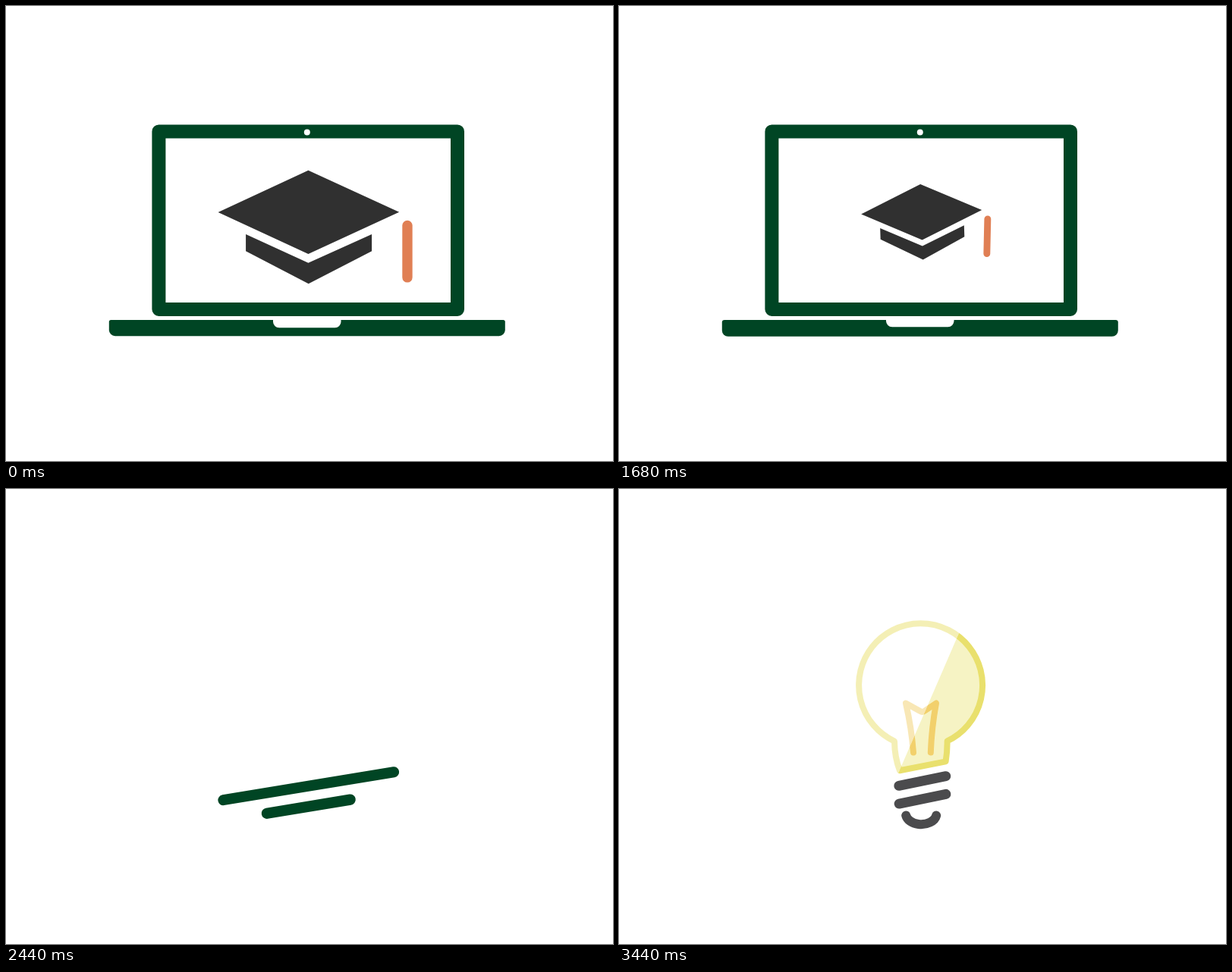
Animation of 800x600 px, one loop 4.04 s. Source, as an HTML page with a canvas:

```html
<!DOCTYPE html>
<html lang="en">
<head>
<meta charset="utf-8">
<title>Laptop to light bulb</title>
<style>
html, body { margin: 0; width: 100%; height: 100%; overflow: hidden; background: #fff; }
canvas { display: block; }
</style>
</head>
<body>
<canvas id="stage" width="800" height="600"></canvas>
<script>
const ctx = document.getElementById('stage').getContext('2d');
const LOOP = 4040, STEP = 40;
const GREEN = [0, 69, 36], GREY = [75, 75, 77];
const ORANGE = [224, 127, 84], OLIVE = [140, 130, 96];

// Progress of t through the time from a to b, and easings of it.
const span = (t, a, b) => Math.min(1, Math.max(0, (t - a) / (b - a)));
const lerp = (a, b, u) => a + (b - a) * u;
const smooth = u => u * u * (3 - 2 * u);
const easeOut = u => 1 - (1 - u) ** 2;
const backIn = (u, s) => u * u * ((s + 1) * u - s);
const backOut = (u, s) => 1 - backIn(1 - u, s);
const mix = (a, b, u) => `rgb(${a.map((v, i) => Math.round(lerp(v, b[i], u)))})`;

const capShape = new Path2D(
  'M-78.4 .2L0-36.3 79 0 0 36.5Z' +
  'M-54.3 19.3L0 44.3 55.2 19.3V34L.2 62.3-54.3 34Z');
const glass = new Path2D(
  'M363 332.6A81.5 81.5 0 1 1 432.6 332.4Q432.8 346 430.6 359.4L370 371.2Q363.3 354 363 332.6Z');
const wire = new Path2D(
  'M388 347.5Q385.5 315 378 282.5L397 293Q400 295 403 292.5L418 282.5Q412 315 410.8 347.5');
const WIRE_LENGTH = 181;

function placed(x, y, degrees, scale, draw) {
  ctx.save();
  ctx.translate(x, y);
  ctx.rotate(degrees * Math.PI / 180);
  ctx.scale(scale, scale);
  draw();
  ctx.restore();
}

function fillBox(x, y, w, h, radii, color) {
  ctx.fillStyle = color;
  ctx.beginPath();
  ctx.roundRect(x, y, w, h, radii);
  ctx.fill();
}

function stroke(path, width, color) {
  ctx.lineWidth = width;
  ctx.strokeStyle = color;
  ctx.stroke(path);
}

// Motion shared by the laptop and the cap as they wind up and drop.
const crouch = t => {
  const u = span(t, 1640, 2120);
  return { u, drift: -8 * u ** 2.5, fold: backIn(span(t, 1720, 2120), 1.1) };
};

// The screen flattens into the upper thread of the bulb.
function drawScreen(t, color, tilt) {
  const { u, drift, fold } = crouch(t);
  const slide = easeOut(span(t, 2200, 2560));
  const x = lerp(398.2 + drift, 399.8, slide);
  const y = lerp(282.7 + 42.5 * fold, 385, backOut(span(t, 2120, 2760), 1.9));
  const hw = lerp(196.8, 31.6, easeOut(span(t, 2240, 2920)));
  const hh = lerp(117.3 - 33.1 * fold, 0, easeOut(span(t, 2120, 2400)));
  placed(x, y, -11.6 * tilt, 1, () => {
    const frame = new Path2D(`M${-hw} ${-hh}H${hw}V${hh}H${-hw}Z`);
    stroke(frame, lerp(18, 13, tilt), color);
    ctx.fillStyle = '#fff';
    ctx.beginPath();
    ctx.arc(-1.4, 1.1 - hh, 4 * (1 - u ** 3), 0, 7);
    ctx.fill();
  });
}

// The keyboard half shrinks into the lower thread.
function drawBase(t, color, tilt) {
  const { drift, fold } = crouch(t);
  const grow = span(t, 1640, 1920);
  const shrink = easeOut(span(t, 2200, 2560));
  const w = lerp(522, 76, shrink);
  const h = lerp(21.2 + 3.8 * grow, 13, shrink);
  const x = lerp(396.8 + drift, 400, shrink);
  const y = lerp(424.6 + 1.9 * grow + 33.5 * fold, 408.7, tilt);
  placed(x, y, -11.6 * tilt, 1, () => {
    const top = lerp(2.5, 8, grow);
    fillBox(-w / 2, -h / 2, w, h, [top, top, 8, 8], color);
    const notch = 10.3 * (1 - span(t, 1640, 2080));
    if (notch > 0) fillBox(-44.8, -h / 2 - 2, 89.5, notch + 2, [0, 0, 8, 8].map(r => Math.min(r, notch)), '#fff');
  });
}

function drawCap(t) {
  const spin = backIn(span(t, 1640, 2157), 2);
  if (spin >= 1) return;
  const { u, drift, fold } = crouch(t);
  const scale = lerp(1.516, 1, smooth(span(t, 240, 1000))) * (1 - spin);
  placed(398.4 + drift, 271.7 + 71.3 * fold, 0, 1, () => {
    placed(0, 0, 180 * spin, scale, () => {
      ctx.fillStyle = '#303030';
      ctx.fill(capShape);
    });
    // The tassel circles the cap while it turns the other way.
    const reach = t < 1640 ? 92.7 * scale : 92.7 * (1 - .72 * u ** 3);
    const orbit = (21.7 + 77 * backIn(u, 3.1)) * Math.PI / 180;
    placed(reach * Math.cos(orbit), reach * Math.sin(orbit), -120 * spin, scale, () =>
      fillBox(-4.4, -27, 8.8, 54, 4.4, mix(ORANGE, OLIVE, span(t, 1920, 2120))));
  });
}

function drawWire(t) {
  const grown = span(t, 2640, 3060);
  if (grown === 0) return;
  ctx.setLineDash([WIRE_LENGTH * grown + (grown === 1 ? 9 : 0), WIRE_LENGTH * 3]);
  ctx.lineDashOffset = -WIRE_LENGTH * .42 * (1 - grown);
  stroke(wire, 8, '#f2d06c');
}

function drawBulb(t) {
  const size = backOut(span(t, 2440, 3400), 1.5);
  if (size <= 0) return;
  const sweep = smooth(span(t, 2440, 3400));
  const top = lerp(393, 455, sweep), bottom = lerp(341.5, 368, sweep);
  const lean = (top - bottom) / 201;
  const scaled = draw => placed(398, 375, 0, size, () => {
    ctx.translate(-398, -375);
    draw();
  });
  // One side of the slanted shade edge, out to the given x.
  const side = (edge, alpha, fill) => {
    ctx.save();
    scaled(() => {
      ctx.beginPath();
      ctx.moveTo(top + 74 * lean, 100);
      ctx.lineTo(bottom - 25 * lean, 400);
      ctx.lineTo(edge, 400);
      ctx.lineTo(edge, 100);
    });
    ctx.clip();
    ctx.globalAlpha = alpha;
    scaled(() => {
      ctx.fillStyle = fill;
      ctx.fill(glass);
      stroke(glass, 8, '#e9e06d');
    });
    drawWire(t);
    ctx.restore();
  };
  side(200, .5, '#fff');
  side(600, 1, '#f6f3c4');
}

function drawTip(t, color) {
  const half = easeOut(span(t, 2560, 3010)) * 80 * Math.PI / 180;
  if (half === 0) return;
  const arc = new Path2D();
  arc.ellipse(398.2, 428, 20.3, 14.2, 0, Math.PI / 2 - half, Math.PI / 2 + half);
  stroke(arc, 12, color);
}

function render(t) {
  ctx.fillStyle = '#fff';
  ctx.fillRect(0, 0, 800, 600);
  ctx.lineCap = ctx.lineJoin = 'round';
  const color = mix(GREEN, GREY, span(t, 2440, 2720));
  const tilt = easeOut(span(t, 2200, 2630));
  drawScreen(t, color, tilt);
  drawBase(t, color, tilt);
  drawCap(t);
  drawBulb(t);
  drawTip(t, color);
}

const start = performance.now();
function tick() {
  const t = (performance.now() - start) % LOOP;
  render(Math.floor(t / STEP) * STEP);
  requestAnimationFrame(tick);
}
tick();
</script>
</body>
</html>
```
